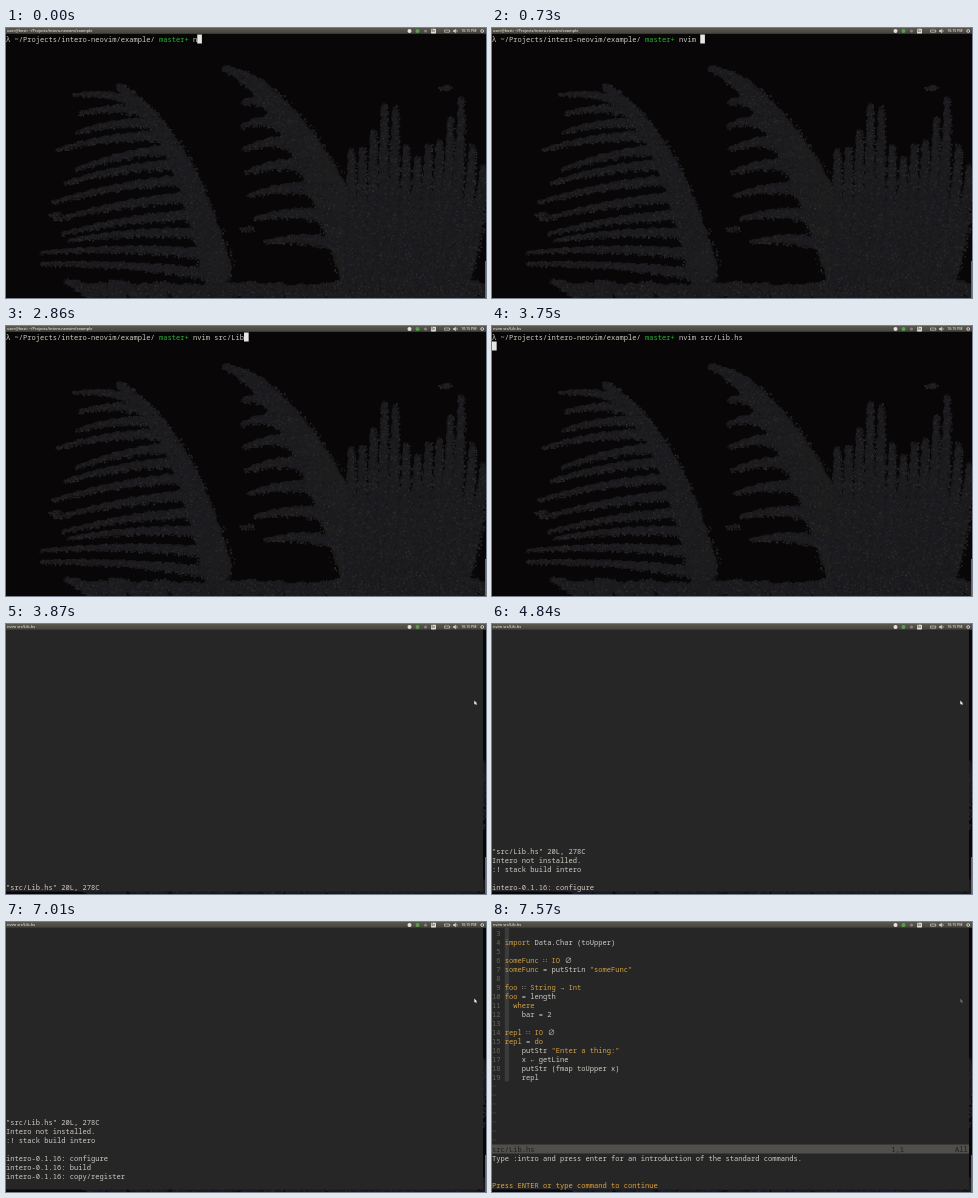
Recreate the animation shown at these times as an HTML page with a canvas. Size 480 by 270 pixels, loop 8000 ms.

```html
<!DOCTYPE html>
<html lang="en">
<head>
<meta charset="utf-8">
<title>Terminal session</title>
<style>
  html, body { margin: 0; width: 100%; height: 100%; overflow: hidden; background: #080606; }
  canvas, svg { position: absolute; left: 0; top: 0; width: 480px; height: 270px; }
  text { white-space: pre; }
  .mono { font: 7.083px "Noto Sans Mono", "DejaVu Sans Mono", monospace; }
  .bar { font: 600 3.85px "Open Sans", sans-serif; fill: #dedbd2; }
</style>
</head>
<body>
<canvas id="wall" width="480" height="270"></canvas>
<svg viewBox="0 0 480 270">
  <defs>
    <linearGradient id="panel" x2="0" y2="1">
      <stop stop-color="#5a574f"/><stop offset="1" stop-color="#45433d"/>
    </linearGradient>
  </defs>
  <g id="screen"></g>
  <rect width="480" height="5.8" fill="url(#panel)"/>
  <text id="title" class="bar" x="1" y="4.2"></text>
  <circle cx="403.5" cy="3" r="2" fill="#e4e2dc"/>
  <circle cx="411.5" cy="3" r="2" fill="#57a04a"/>
  <circle cx="419.5" cy="3" r="1.6" fill="#85827a"/>
  <rect x="425" y="0.8" width="5" height="4.6" rx=".6" fill="#dedbd2"/>
  <text class="bar" x="425.6" y="4.2" style="font-size:3px;fill:#45433d">En</text>
  <path d="M438.5 2h5v2.2h-5zM444 2.6v1" fill="none" stroke="#c8c5bc" stroke-width=".7"/>
  <path d="M447.3 2.3h1l1.4-1.3v4l-1.4-1.3h-1zM450.8 1.6q1 1.4 0 2.8" fill="#dedbd2" stroke="#dedbd2" stroke-width=".3"/>
  <text class="bar" x="455.2" y="4.2" style="font-size:3.5px">10:15 PM</text>
  <circle cx="476.2" cy="3" r="1.4" fill="none" stroke="#dedbd2" stroke-width=".9"/>
</svg>
<script>
const COL = 4.25, ROW = 9, TOP = 6.5, LOOP = 8000;
const FG = '#cfcbc2', GOLD = '#d2a044', GREEN = '#2bb13a';
const screen = document.getElementById('screen');
const title = document.getElementById('title');

// ---- wallpaper: two soft clumps of flower stems ----
function paintWallpaper() {
  const ctx = document.getElementById('wall').getContext('2d');
  let seed = 7;
  const rand = () => (seed = (seed * 16807) % 2147483647) / 2147483647;
  const spread = n => (rand() - 0.5) * 2 * n;
  const point = (x, y) => ({ x, y });
  const curve = (a, b, c, t) => {
    const mix = k => (1 - t) ** 2 * a[k] + 2 * t * (1 - t) * b[k] + t * t * c[k];
    return point(mix('x'), mix('y'));
  };

  // fuzzy stem from tip to base, widening from w0 to w1
  function stem(tip, bend, base, w0, w1) {
    const length = Math.hypot(base.x - tip.x, base.y - tip.y);
    const phase = rand() * 6;
    for (let d = 0; d < length; d++) {
      const t = d / length, p = curve(tip, bend, base, t);
      const r = (w0 + (w1 - w0) * t) * (0.6 + 0.4 * Math.abs(Math.sin(d / 4 + phase)));
      ctx.fillStyle = 'rgba(30,30,32,.3)';
      ctx.beginPath();
      ctx.arc(p.x, p.y, r, 0, 7);
      ctx.fill();
      for (let i = 0; i < r; i++) {
        const angle = rand() * 6.3, reach = r * Math.sqrt(rand()) * 1.25;
        const shade = 22 + Math.floor(rand() * 23);
        ctx.fillStyle = `rgb(${shade},${shade},${shade + 2})`;
        ctx.fillRect(p.x + Math.cos(angle) * reach, p.y + Math.sin(angle) * reach, 1 + rand(), 1 + rand());
      }
    }
  }

  ctx.fillStyle = '#080606';
  ctx.fillRect(0, 0, 480, 270);

  // left clump: branches reach left from a bowed spine
  const leftSpine = [point(112, 58), point(180, 105), point(212, 250)];
  stem(...leftSpine, 4, 17);
  for (let f = 0; f <= 1; f += 0.09) {
    const root = curve(...leftSpine, 0.15 + 0.85 * f);
    const tip = point(root.x - 72 - 95 * f + spread(14), root.y - 12 + 34 * Math.sin(Math.PI * f) + spread(5));
    stem(tip, point((tip.x + root.x) / 2, (tip.y + root.y) / 2 - 8), root, 2.2, 6);
  }

  // right clump: left-leaning branches, then upright ones along the edge
  const rightSpine = [point(218, 40), point(290, 60), point(365, 265)];
  stem(...rightSpine, 3, 26);
  for (let f = 0; f <= 1; f += 0.14) {
    const root = curve(...rightSpine, 0.3 + 0.6 * f);
    const tip = point(233 + 26 * f * f + spread(4), 52 + 165 * f);
    stem(tip, point((tip.x + root.x) / 2, (tip.y + root.y) / 2 - 12), root, 2.5, 9);
  }
  for (let x = 345; x <= 480; x += 11) {
    const tip = point(x, 105 + 30 * Math.cos((x - 345) / 11) + spread(14));
    const base = point(x - 0.25 * (x - 360), 275);
    stem(tip, point(x, 190), base, 3.5, 11);
  }

  // low growth and a few stray heads
  for (let x = 60; x < 480; x += 22) {
    stem(point(x, 258 + spread(5)), point(x + 14, 256), point(x + 34, 270), 3, 9);
  }
  for (const p of [point(438, 60), point(240, 201), point(48, 187)]) {
    stem(point(p.x - 5, p.y), p, point(p.x + 5, p.y - 1), 2, 3);
  }

  ctx.fillStyle = '#6a6864';
  ctx.fillRect(479, 233, 1, 37);
}

// ---- text grid ----
const rect = (x, y, w, h, fill) => `<rect x="${x}" y="${y}" width="${w}" height="${h}" fill="${fill}"/>`;
const cursor = (col, row) => rect(col * COL, TOP + row * ROW, COL + 0.4, ROW, '#e6e6e6');

// pieces between asterisks take the accent colour
function line(str, row, col = 0, accent = GOLD, color = FG, extra = '') {
  return str.split('*').map((part, i) => {
    const x = col * COL;
    col += part.length;
    return `<text class="mono" x="${x}" y="${TOP + row * ROW + 7}" fill="${i % 2 ? accent : color}" ${extra}>${part}</text>`;
  }).join('');
}

const pointer = fill => `<path d="M468.3 76.6v4l1-.8.7 1.4.7-.4-.7-1.3h1.2z" fill="${fill}"/>`;
const editor = body => rect(0, 5.8, 477, 261.7, '#262626') + body;

// ---- shell ----
const PROMPT = 'λ ~/Projects/intero-neovim/example/ *master+* ';
const PROMPT_COLS = PROMPT.length - 2;
const COMMAND = 'nvim src/Lib.hs';
const SHELL_TITLE = 'user@host: ~/Projects/intero-neovim/example';
const FILE_TITLE = COMMAND;

const prompt = count => line(PROMPT + COMMAND.slice(0, count), 0, 0, GREEN);
const shell = (count, lit = true) =>
  [SHELL_TITLE, prompt(count) + (lit ? cursor(PROMPT_COLS + count, 0) : '')];
const launched = name => [name, prompt(COMMAND.length) + cursor(0, 1)];

// one burst of keys; ease above 1 slows down, below 1 speeds up
function burst(start, end, first, last, ease) {
  return Array.from({ length: last - first + 1 }, (_, i) =>
    [start + (end - start) * (i / (last - first)) ** ease, shell(first + i)]);
}

// ---- editor ----
const LOG = [
  [3870, '"src/Lib.hs" 20L, 278C'],
  [4060, 'Intero not installed.'],
  [4410, ':! stack build intero'],
  [4470, ''],
  [4840, 'intero-0.1.16: configure'],
  [6270, 'intero-0.1.16: build'],
  [6950, 'intero-0.1.16: copy/register'],
  [7010, '']
];
const log = last => [FILE_TITLE, editor(
  LOG.slice(0, last + 1).map(([, s], i) => line(s, 28 - last + i)).join('') + pointer('#f0f0f0'))];

const SOURCE = `*module* Lib
    ( someFunc
    ) *where*

*import* Data.Char (toUpper)

*someFunc* ∷ *IO* ∅
*someFunc* = putStrLn *"someFunc"*

*foo* ∷ *String* → *Int*
*foo* = length
  *where*
    bar = 2

*repl* ∷ *IO* ∅
*repl* = *do*
    putStr *"Enter a thing:"*
    x ← getLine
    putStr (fmap toUpper x)
    repl`.split('\n');
const INTRO = 'Type :intro and press enter for an introduction of the standard commands.';
const CONTINUE = '*Press ENTER or type command to continue*';

function buffer(scroll, messages) {
  const status = 27 - scroll;
  let out = rect(3 * COL, 5.8, COL, TOP + (SOURCE.length - scroll) * ROW - 5.8, '#3b3b3b');
  for (let row = 0; row < status; row++) {
    const n = row + scroll;
    out += n < SOURCE.length
      ? line(String(n || 1).padStart(2), row, 0, GOLD, '#68655f') + line(SOURCE[n], row, 3)
      : line('~', row, 0, GOLD, '#55534e');
  }
  out += rect(0, TOP + status * ROW, 477, ROW, '#504f4b');
  out += line('src/Lib.hs'.padEnd(94) + '1,1'.padEnd(15) + 'All', status, 0, GOLD, '#1f1f1d');
  return [FILE_TITLE, editor(out + messages + pointer('#6a6a6a'))];
}

// ---- timeline ----
const scenes = [
  [0, shell(1)],
  ...burst(150, 730, 2, 5, 2),
  [1240, shell(5, false)],
  [1840, shell(5)],
  ...burst(2010, 2860, 6, 12, 1.3),
  ...burst(3090, 3400, 13, 15, 0.3),
  [3690, launched(SHELL_TITLE)],
  [3750, launched(FILE_TITLE)],
  ...LOG.map(([at], i) => [at, log(i)]),
  [7340, buffer(0, '')],
  [7390, buffer(0, line(INTRO, 28))],
  [7570, buffer(3, line(INTRO, 25) + line(CONTINUE, 28, 0, '#dda23c', FG, 'font-weight="700"'))]
];

let shown = null;
function update() {
  const t = performance.now() % LOOP;
  const scene = scenes.filter(([at]) => at <= t).pop();
  if (scene !== shown) {
    shown = scene;
    [title.textContent, screen.innerHTML] = scene[1];
  }
  requestAnimationFrame(update);
}

paintWallpaper();
update();
</script>
</body>
</html>
```
